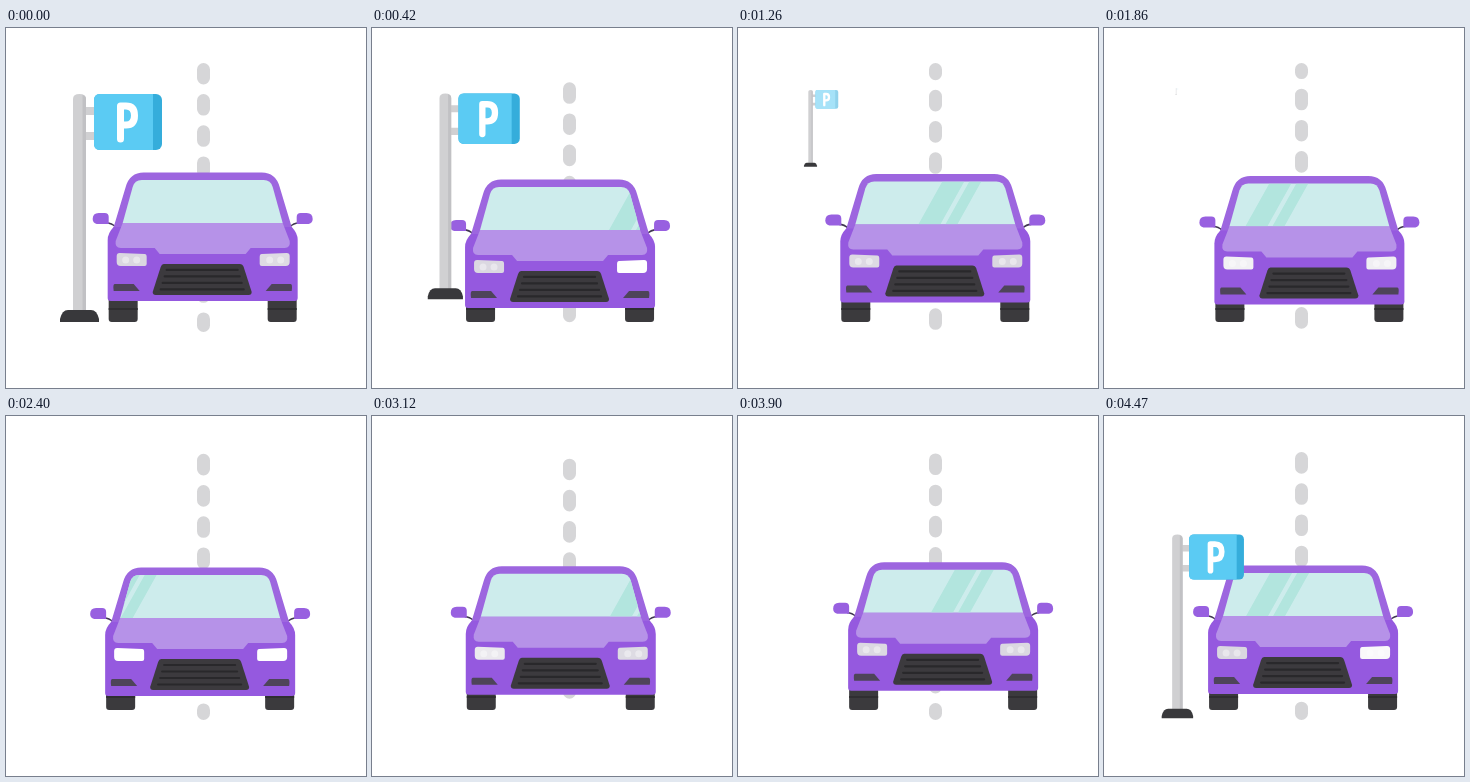
Recreate the animation shown at these times as an HTML page. Size 360x360 px, loop 4.5 s.

```html
<!DOCTYPE html>
<html lang="en">
<head>
<meta charset="utf-8">
<title>Car passing a parking sign</title>
<style>
  html, body { margin: 0; width: 100%; height: 100%; overflow: hidden; background: #fff; }
  svg { display: block; width: 100%; height: 100%; }
</style>
</head>
<body>
<svg viewBox="0 0 360 360">
  <defs>
    <path id="glass" d="M-80 195L-70 159Q-68 152 -61 152H61Q68 152 70 159L80 195Z"/>
    <clipPath id="glassClip"><use href="#glass"/></clipPath>
    <g id="wheel">
      <rect x="-94" y="262" width="29" height="32" rx="3" fill="#3b3a3d"/>
      <path d="M-94 281h29" stroke="#2f2e31" stroke-width="2"/>
    </g>
    <g id="mirror">
      <path d="M-96 195Q-91 195 -87 199" fill="none" stroke="#3f3650" stroke-width="1.6"/>
      <path d="M-104 185H-98Q-94 185 -94 189V196H-106Q-110 195 -110 191Q-110 185 -104 185Z" fill="#9860e0"/>
    </g>
    <path id="fog" d="M-88 256H-69L-63 263H-89Q-90 256 -88 256Z" fill="#4e4459"/>
    <g id="lamp">
      <path d="M-83 225L-58 226Q-56 226 -56 229V236Q-56 238 -58 238H-82Q-86 238 -86 234V228Q-86 225 -83 225Z"/>
      <path d="M-77 232h0M-66 232h0" stroke="#fff" stroke-opacity=".4" stroke-width="7" stroke-linecap="round"/>
    </g>
  </defs>

  <line id="road" x1="197.5" x2="197.5" y1="41.5" y2="297.5" stroke="#d6d6d8" stroke-width="13"
        stroke-linecap="round" stroke-dasharray="8.6 22.6"/>

  <g id="car">
    <use href="#wheel"/>
    <use href="#wheel" transform="scale(-1 1)"/>
    <g id="body">
      <use href="#mirror"/>
      <use href="#mirror" transform="scale(-1 1)"/>
      <path fill="#9d66df" d="M-92 205L-89 199L-77 159Q-73 144.5 -59 144.5H59Q73 144.5 77 159L89 199L92 205Z"/>
      <path fill="#9559df" d="M-95 270V212Q-95 205 -89 199H89Q95 205 95 212V270Q95 273 92 273H-92Q-95 273 -95 270Z"/>
      <use href="#glass" fill="#cdecec"/>
      <g clip-path="url(#glassClip)">
        <path id="glint" fill="#b2e5de" d="M0 195h22l24-43h-22zM27 195h12l24-43h-12z"/>
      </g>
      <path fill="#b692e8" d="M-80 195H80L87 213Q88 220 82 220H48L43 226H-43L-48 220H-82Q-88 220 -87 213Z"/>
      <use href="#fog"/>
      <use href="#fog" transform="scale(-1 1)"/>
      <use href="#lamp" id="lampL"/>
      <use href="#lamp" id="lampR" transform="translate(1 0) scale(-1 1)"/>
      <path fill="#3c3a3e" d="M-39 236H37Q40 236 41 239L49 264Q49 267 46 267H-47Q-50 267 -50 264L-42 239Q-41 236 -39 236Z"/>
      <path d="M-36 242H35M-38 248.5H37M-40 255H39M-42 261.5H41" stroke="#29282b" stroke-width="2.2" stroke-linecap="round"/>
    </g>
  </g>

  <g id="sign">
    <path d="M78 83H88M78 108H88" stroke="#d0d0d2" stroke-width="8"/>
    <path d="M67 286V71Q67 66 73.5 66Q80 66 80 71V286Z" fill="#d0d0d2"/>
    <path d="M76.5 286V67Q80 68 80 71V286Z" fill="#c1c1c4"/>
    <path d="M54 294V291Q56 282 62 282H85Q91 282 93 291V294Z" fill="#38383b"/>
    <g id="panel">
      <rect x="88" y="66" width="68" height="56" rx="6" fill="#35addb"/>
      <path d="M94 66H147V122H94Q88 122 88 116V72Q88 66 94 66Z" fill="#5bcbf3"/>
    </g>
    <path d="M114.5 111V78H120Q128.5 78 128.5 87.5Q128.5 97 120 97H114.5" fill="none"
          stroke="#fff" stroke-width="7" stroke-linecap="round" stroke-linejoin="round"/>
  </g>
</svg>
<script>
const LOOP = 4500;
const $ = id => document.getElementById(id);
const set = (id, name, value) => $(id).setAttribute(name, value);
const linear = p => p;
const swing = p => (1 - Math.cos(Math.PI * p)) / 2;

// Value at time t between [time, value] keys
function tween(keys, t, ease = linear) {
  const i = Math.max(1, keys.findIndex(k => k[0] >= t));
  const [[t0, a], [t1, b]] = [keys[i - 1], keys[i]];
  return a + (b - a) * ease((t - t0) / (t1 - t0));
}

const SWAY = [[-590, 205.6], [640, 186.6], [1790, 205.6], [2870, 186.6], [4015, 205.6], [5160, 186.6]];
const ROAD = [[0, 0], [1260, 222.6], [2400, 402.6], [LOOP, 752.6]];
const LAMP_L = [[0, 0], [1500, .1], [2100, 1], [2700, 1], [3400, .1], [LOOP, 0]];
const LAMP_R = [[0, .1], [300, 1], [550, 1], [900, 0], [1500, 0], [2100, 1], [2600, 1], [3000, .1], [4100, 0], [LOOP, .9]];

function lampColor(keys, t) {
  const w = tween(keys, t);
  return `rgb(${218 + 37 * w},${215 + 40 * w},${224 + 31 * w})`;
}

// The sign grows in from below, then shrinks and pales into the distance
function drawSign(t) {
  const leaving = t < 3000;
  const scale = leaving ? 1 - swing(Math.min(1, t / 2080)) : Math.max(0, (t - 3900) / 708);
  const [x, y] = leaving ? [72, 60] : [73, 337];
  set('sign', 'transform', `translate(${x} ${y}) scale(${scale}) translate(${-x} ${-y})`);
  set('panel', 'opacity', Math.min(1, scale * 1.6));
}

function draw(t) {
  const bounce = 3.5 - 3.8 * Math.cos(2 * Math.PI * (t / 663 - .06));
  set('road', 'stroke-dashoffset', tween(ROAD, t));
  set('car', 'transform', `translate(${tween(SWAY, t, swing)} 0)`);
  set('body', 'transform', `translate(0 ${bounce})`);
  set('glint', 'transform', `translate(${82 - .0785 * (t % 2700)} 0)`);
  set('lampL', 'fill', lampColor(LAMP_L, t));
  set('lampR', 'fill', lampColor(LAMP_R, t));
  drawSign(t);
}

const start = performance.now();
function tick() {
  draw((performance.now() - start) % LOOP);
  requestAnimationFrame(tick);
}
tick();
</script>
</body>
</html>
```
